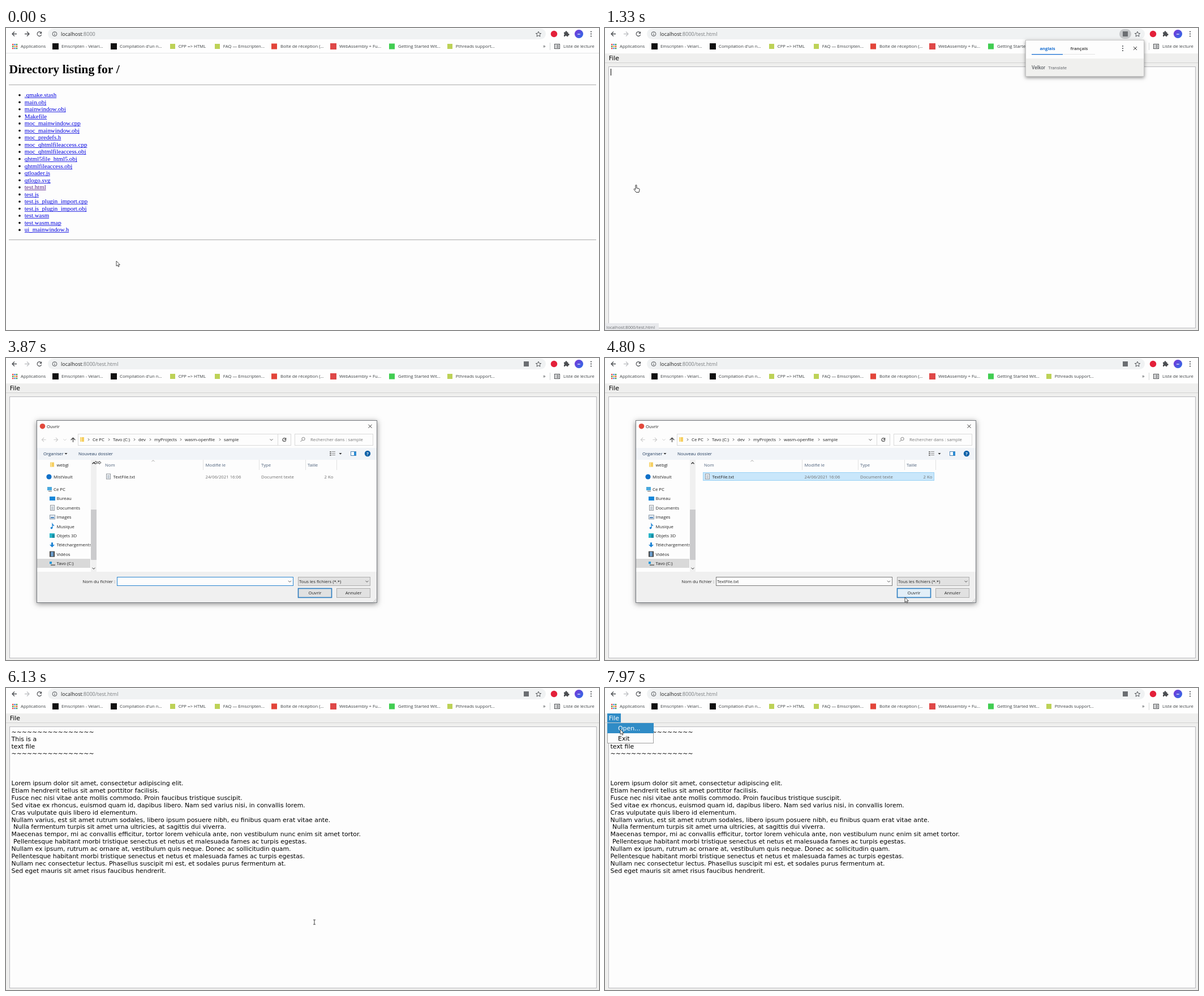
Write an HTML page with a canvas that moves like this. It is 1048 by 534 pixels and loops after 8000 ms.

```html
<!DOCTYPE html>
<html lang="fr">
<head>
<meta charset="utf-8">
<title>File access demo</title>
<style>
html, body { margin: 0; width: 100%; height: 100%; overflow: hidden; background: #fdfdfd }
canvas { display: block }
</style>
</head>
<body>
<canvas id="stage" width="1048" height="534"></canvas>
<script>
const ctx = document.getElementById('stage').getContext('2d');
const LOOP = 8000, PAPER = '#fdfdfd', INK = '#222', BLUE = '#308cc6';
const UI = '"Open Sans", sans-serif', QT = '"DejaVu Sans", sans-serif', SERIF = '"Liberation Serif", serif';

const between = (t, a, b) => t >= a && t < b;

function rect(x, y, w, h, fill, stroke, lineWidth = 1) {
  if (fill) { ctx.fillStyle = fill; ctx.fillRect(x, y, w, h); }
  if (stroke) { ctx.strokeStyle = stroke; ctx.lineWidth = lineWidth; ctx.strokeRect(x + .5, y + .5, w - 1, h - 1); }
}
function round(x, y, w, h, r, fill) {
  ctx.fillStyle = fill; ctx.beginPath(); ctx.roundRect(x, y, w, h, r); ctx.fill();
}
function disc(x, y, r, fill) {
  ctx.fillStyle = fill; ctx.beginPath(); ctx.arc(x, y, r, 0, 7); ctx.fill();
}
function ring(x, y, r, color, width = 1, from = 0, to = 2 * Math.PI) {
  ctx.strokeStyle = color; ctx.lineWidth = width;
  ctx.beginPath(); ctx.arc(x, y, r, from, to); ctx.stroke();
}
function path(d, x, y, stroke, width = 1, fill) {
  ctx.save(); ctx.translate(x, y);
  const p = new Path2D(d);
  if (fill) { ctx.fillStyle = fill; ctx.fill(p); }
  if (stroke) { ctx.strokeStyle = stroke; ctx.lineWidth = width; ctx.stroke(p); }
  ctx.restore();
}
// y is the baseline
function text(s, x, y, color = INK, size = 7.75, family = UI, weight = 400, align = 'left') {
  ctx.font = `${weight} ${size}px ${family}`;
  ctx.fillStyle = color; ctx.textAlign = align;
  ctx.fillText(s, x, y);
}
function shadowed(x, y, w, h, fill, blur) {
  ctx.save();
  ctx.shadowColor = 'rgba(0,0,0,.45)'; ctx.shadowBlur = blur; ctx.shadowOffsetY = 2;
  rect(x, y, w, h, fill);
  ctx.restore();
}

const ARROW = 'M-4 0H4M0-4L-4 0L0 4';
function arrow(x, y, angle, color, scale = 1) {
  ctx.save(); ctx.translate(x, y); ctx.rotate(angle); ctx.scale(scale, scale);
  path(ARROW, 0, 0, color, 1.3);
  ctx.restore();
}
const chevron = (x, y, color = '#555') => path('M-2.5-1.2L0 1.3L2.5-1.2', x, y, color);
const cross = (x, y, r = 3) => path(`M${-r} ${-r}L${r} ${r}M${r} ${-r}L${-r} ${r}`, x, y, '#333');
const dots = (x, y) => [-4, 0, 4].forEach(d => disc(x, y + d, 1.1, '#4a4d51'));
const folder = (x, y) => { rect(x, y - 4, 7, 8, '#f6cf60'); rect(x + 1, y - 4, 2, 8, '#fbe39a'); };
const reload = (x, y, r, color) => {
  ring(x, y, r, color, 1.2, .3, 5.4);
  path('M0-4V0H-4Z', x + r + .3, y - r + 3.2, null, 0, color);
};

const bookmarks = [
  [82, '#111', 11, 'Emscripten - Velari...'], [185, '#111', 11, "Compilation d'un n..."],
  [290, '#bdd257', 9, 'CPP => HTML'], [369, '#bdd257', 9, 'FAQ — Emscripten...'],
  [469, '#e2453a', 10, 'Boîte de réception (...'], [573, '#df4848', 11, 'WebAssembly + Fu...'],
  [677, '#41cd52', 10, 'Getting Started Wit...'], [780, '#bdd257', 9, 'Pthreads support...'],
];

function drawBrowser(onApp, popup) {
  rect(0, 0, 1048, 45, '#fefefe');
  arrow(15, 10.5, 0, '#4a4d51');
  arrow(37, 10.5, Math.PI, onApp ? '#bfc1c4' : '#4a4d51');
  reload(59, 10.5, 3.8, '#4a4d51');
  round(74, 1, 880, 19, 9.5, '#f0f2f3');
  ring(86, 10.5, 3.9, '#55585c');
  rect(85.5, 10, 1, 3, '#55585c'); rect(85.5, 8, 1, 1, '#55585c');
  text('localhost', 97, 13.8, INK, 9);
  const host = ctx.measureText('localhost').width;
  text(':8000' + (onApp ? '/test.html' : ''), 97 + host, 13.8, '#777a7d', 9);
  if (onApp) {
    if (popup) round(909, 2, 21, 17, 8.5, '#c6c8ca');
    rect(915, 6, 9, 9, '#6b6e72');
  }
  path('M0-4.6L1.4-1.5L4.7-1.2L2.2 1L3 4.3L0 2.5L-3 4.3L-2.2 1L-4.7-1.2L-1.4-1.5Z', 941, 10.8, '#55585c');
  disc(968.5, 10.5, 5.8, '#e3203a');
  path('M-4-2.5H-1.5A1.6 1.6 0 1 1 1.5-2.5H3.5V0A1.6 1.6 0 1 1 3.5 3V5H1A1.5 1.5 0 0 0-2 5H-4V2.5A1.5 1.5 0 0 0-4-.2Z', 990, 10, null, 0, '#4a4d51');
  const glow = ctx.createLinearGradient(1005, 4, 1020, 17);
  glow.addColorStop(0, '#7a35d8'); glow.addColorStop(1, '#2b6ee6');
  disc(1012.5, 10.5, 7.6, glow);
  text('we', 1012.5, 11.5, '#fff', 3.5, UI, 700, 'center');
  dots(1034, 10.5);

  const palette = ['#e5453a', '#f0b429', '#3d9a50', '#4285e8'];
  for (let i = 0; i < 9; i++) rect(11 + i % 3 * 3.4, 28 + (i / 3 | 0) * 3.4, 2.4, 2.4, palette[(i * 3 + (i / 3 | 0)) % 4]);
  text('Applications', 26, 35.3, '#3c4043');
  for (const [x, color, size, label] of bookmarks) {
    rect(x, 32.5 - size / 2, size, size, color);
    text(label, x + (size === 9 ? 14.8 : 16), 35.3, '#3c4043');
  }
  text('»', 949, 35, '#3c4043', 9);
  rect(961, 26, 1, 13, '#d4d6d8');
  rect(969, 28, 10, 9, null, '#4a4d51');
  for (let y = 30; y < 36; y += 2) { rect(971, y, 1, 1, '#4a4d51'); rect(973, y, 4, 1, '#4a4d51'); }
  text('Liste de lecture', 985, 35.3, '#3c4043');
}

const files = `.qmake.stash main.obj mainwindow.obj Makefile moc_mainwindow.cpp moc_mainwindow.obj
moc_predefs.h moc_qhtmlfileaccess.cpp moc_qhtmlfileaccess.obj qhtml5file_html5.obj qhtmlfileaccess.obj
qtloader.js qtlogo.svg test.html test.js test.js_plugin_import.cpp test.js_plugin_import.obj test.wasm
test.wasm.map ui_mainwindow.h`.split(/\s+/);

function drawListing() {
  text('Directory listing for /', 5.5, 80.3, '#000', 21.7, SERIF, 700);
  rect(5, 100, 1038, 1, '#aaa'); rect(5, 374, 1038, 1, '#aaa');
  files.forEach((name, i) => {
    const y = 122 + i * 12.55, color = name === 'test.html' ? '#551a8b' : '#0000e0';
    disc(24, y - 3.3, 1.8, '#000');
    text(name, 32.8, y, color, 10.92, SERIF);
    rect(32.8, Math.round(y + 1), ctx.measureText(name).width, .8, color);
  });
}

const TILDES = '~'.repeat(16);
const loaded = [TILDES, 'This is a', 'text file', TILDES, '', '', '',
  'Lorem ipsum dolor sit amet, consectetur adipiscing elit.',
  'Etiam hendrerit tellus sit amet porttitor facilisis.',
  'Fusce nec nisi vitae ante mollis commodo. Proin faucibus tristique suscipit.',
  'Sed vitae ex rhoncus, euismod quam id, dapibus libero. Nam sed varius nisi, in convallis lorem.',
  'Cras vulputate quis libero id elementum.',
  'Nullam varius, est sit amet rutrum sodales, libero ipsum posuere nibh, eu finibus quam erat vitae ante.',
  ' Nulla fermentum turpis sit amet urna ultricies, at sagittis dui viverra.',
  'Maecenas tempor, mi ac convallis efficitur, tortor lorem vehicula ante, non vestibulum nunc enim sit amet tortor.',
  ' Pellentesque habitant morbi tristique senectus et netus et malesuada fames ac turpis egestas.',
  'Nullam ex ipsum, rutrum ac ornare at, vestibulum quis neque. Donec ac sollicitudin quam.',
  'Pellentesque habitant morbi tristique senectus et netus et malesuada fames ac turpis egestas.',
  'Nullam nec consectetur lectus. Phasellus suscipit mi est, et sodales purus fermentum at.',
  'Sed eget mauris sit amet risus faucibus hendrerit.'];

function drawApp(t, menu, mouseY) {
  rect(0, 45, 1048, 489, '#efefee');
  rect(0, 61, 1048, 1, '#d2d2d2');
  rect(6, 68, 1038, 463, PAPER, '#b9b9bd');
  if (t >= 5450) loaded.forEach((line, i) => text(line, 9.6, 81.5 + i * 12.92, '#000', 10.9, QT));
  if (between(t, 1150, 2400) && (t - 1150) % 1060 < 530) rect(10, 72, 1, 12, '#000');
  if (menu) rect(4, 45, 24, 16, BLUE);
  text('File', 6.8, 56.8, menu ? '#fff' : '#000', 10.9, QT);
  if (menu) {
    const hover = mouseY > 62;
    rect(4, 62, 82, 36, PAPER, '#a0a0a0');
    if (hover) rect(4, 62, 82, 18, BLUE);
    text('Open...', 23, 75, hover ? '#fff' : '#000', 10.9, QT);
    text('Exit', 23, 93.3, '#000', 10.9, QT);
  }
}

function drawTranslatePopup() {
  shadowed(743, 21, 210, 65, PAPER, 6);
  rect(743, 54, 210, 32, '#f0f0ee');
  rect(743, 21, 210, 65, null, '#c4c4c4');
  text('anglais', 782, 39, '#1a70d2', 7.7, UI, 700, 'center');
  text('français', 838, 39, '#555', 7.7, UI, 700, 'center');
  rect(754, 46, 55, 1.3, '#1a70d2'); rect(809, 46, 57, 1, '#e4e4e4');
  dots(915, 36); cross(937, 36);
  text('Velkor', 754, 72.7, '#5f6368', 8.4, 'Roboto, sans-serif', 500);
  text('Translate', 816, 72.7, '#6b6e72', 8, 'Roboto, sans-serif', 400, 'right');
}

const crumbs = [[153, 'Ce PC'], [189, 'Tavo (C:)'], [234, 'dev'], [262, 'myProjects'], [316, 'wasm-openfile'], [385, 'sample']];
const columns = [[175, 'Nom', 348], [352.5, 'Modifié le', 447], [451, 'Type', 529], [533, 'Taille', 584]];
const places = ['Bureau', 'Documents', 'Images', 'Musique', 'Objets 3D', 'Téléchargements', 'Vidéos', 'Tavo (C:)'];

function page(x, y) {
  rect(x, y - 5, 8, 10, '#fafafa', '#8d949b');
  for (let d = -2; d < 4; d += 2) rect(x + 2, y + d, 4, .8, '#7a8fa5');
}
function placeIcon(i, y) {
  const x = 77;
  if (i === 0) rect(x, y - 3.5, 10, 7, '#1687d9');
  if (i === 1) page(x + 1, y);
  if (i === 2) { rect(x, y - 4, 10, 8, '#e8eef4', '#8a99a8'); rect(x + 2, y, 6, 2, '#3c77b5'); }
  if (i === 3) { disc(x + 3.5, y + 3, 1.8, '#1d83d4'); path('M0 7V0Q1 2 3 3', x + 5, y - 4, '#1d83d4', 1.3); }
  if (i === 4) { rect(x, y - 4, 9, 8, '#28b4c8'); rect(x + 4.5, y - 2, 4.5, 6, '#168ba2'); }
  if (i === 5) path('M3-4H6V0H9L4.5 4.5L0 0H3Z', x, y, null, 0, '#1d83d4');
  if (i === 6) { rect(x, y - 5, 9, 10, '#444'); rect(x + 2, y - 4, 5, 8, '#6a9bc9'); }
  if (i === 7) { rect(x, y - 3, 4, 4, '#2196d8'); rect(x + 2, y + 2, 8, 2, '#777'); }
}

function drawDialog(selected, rowHover, openHover) {
  shadowed(54, 110, 602, 323, PAPER, 9);
  disc(64.5, 120.7, 4.8, '#e2493c');
  text('Ouvrir', 72, 123.7); cross(643.5, 120.7);
  arrow(67, 144.5, 0, '#ccc', .9); arrow(88, 144.5, Math.PI, '#ccc', .9);
  chevron(104, 144.5, '#ccc'); arrow(118.5, 145, Math.PI / 2, '#444', .95);

  rect(127, 134, 377, 21, null, '#dadada'); rect(480, 134, 1, 21, '#dadada');
  folder(131, 144);
  for (const [x, label] of crumbs) {
    path('M-1-2L1 0L-1 2', x - 7, 144.3, '#555');
    text(label, x, 147.3);
  }
  chevron(469, 144.5); reload(492, 144.5, 3, '#555');
  rect(510, 134, 139, 21, null, '#dadada');
  ring(525.5, 143, 2.7, '#777', .9); path('M0 0L-3 3', 523.5, 145, '#777');
  text('Rechercher dans : sample', 538, 147.3, '#777');

  rect(54, 159, 602, 21, '#f1f4f8');
  text('Organiser', 66, 172.3, '#1e395b'); text('Nouveau dossier', 128, 172.3, '#1e395b');
  for (const x of [106, 591]) path('M-2.5-1H2.5L0 1.8Z', x, 169, null, 0, '#333');
  for (let y = 165; y < 173; y += 3) { rect(572, y, 3, 2, '#888'); rect(576, y, 6, 1, '#888'); }
  rect(609, 165, 10, 8, '#fff', '#4c84b5'); rect(615, 166, 4, 6, '#2b8cd6');
  disc(639, 169, 5.2, '#1062a8'); text('?', 639, 171.8, '#fff', 7.5, UI, 700, 'center');

  ctx.save();
  ctx.beginPath(); ctx.rect(54, 180, 95.5, 198); ctx.clip();
  rect(54, 355, 95, 16, '#d9d9d9');
  folder(78, 188.5); text('webgl', 89.5, 191.5);
  disc(76, 210, 4.6, '#1070c8'); text('MistVault', 84, 213);
  rect(73, 228, 8, 6, '#4aa8dc'); rect(75, 235, 6, 1, '#666'); text('Ce PC', 84, 235);
  places.forEach((name, i) => {
    const y = 248.5 + i * 16.37;
    placeIcon(i, y);
    text(name, 89.5, y + 2.9);
  });
  ctx.restore();
  rect(150, 180, 10, 198, '#f0f0f0'); rect(150, 268, 10, 89, '#cbcbcd');
  path('M-2.5 1.2L0-1.3L2.5 1.2', 155, 186, '#333', 1.3); chevron(155, 372, '#333');

  for (const [x, label, edge] of columns) {
    text(label, x, 191.8, '#4c607a');
    rect(edge, 180, 1, 18, '#e2e2e2');
  }
  path('M-2.5 1.2L0-1.3L2.5 1.2', 260, 182, '#888', .8);
  if (selected) rect(173, 202, 409, 15, '#c9e7fb', '#99d1f5');
  else if (rowHover) rect(173, 202, 409, 15, '#e5f3fb');
  page(177, 209.5);
  text('TextFile.txt', 189.5, 212.8);
  text('24/06/2021 16:06', 352.5, 212.8, '#6d6d6d');
  text('Document texte', 451, 212.8, '#6d6d6d');
  text('2 Ko', 578.5, 212.8, '#6d6d6d', 7.75, UI, 400, 'right');

  rect(54, 378, 602, 55, '#f0f0f0');
  text('Nom du fichier :', 193, 397.6, INK, 7.75, UI, 400, 'right');
  rect(196, 387, 312, 16, PAPER, selected ? '#7a7a7a' : '#2b86d0');
  if (selected) text('TextFile.txt', 198, 397.6);
  rect(516, 387, 128, 16, '#e2e2e2', '#adadad');
  text('Tous les fichiers (*.*)', 518, 397.6);
  chevron(501.5, 395); chevron(638, 395);
  rect(516, 407, 60, 17, openHover ? '#e3eff8' : '#e1e1e1', '#2b7cc0', 1.6);
  rect(584, 407, 60, 17, '#e1e1e1', '#adadad');
  text('Ouvrir', 546, 418.2, INK, 7.75, UI, 400, 'center');
  text('Annuler', 614, 418.2, INK, 7.75, UI, 400, 'center');
  for (let i = 0; i < 3; i++) for (let j = 0; j <= i; j++) rect(653 - j * 2, 426 + i * 2, 1, 1, '#aaa');
  rect(54, 110, 602, 323, null, '#777b80');
}

// time, x, y of the pointer's hot spot
const route = [[0, 195, 412], [30, 195, 412], [620, 54, 278], [1500, 54, 278], [2200, 18, 52], [2400, 18, 52],
  [2950, 28, 68], [3300, 28, 68], [3870, 162, 185], [4200, 214, 209], [4400, 214, 209], [4800, 530, 423],
  [5000, 545, 414], [6270, 545, 414], [7250, 20, 52], [7550, 20, 52], [7900, 27, 73], [LOOP, 27, 73]];
const clicks = [720, 2480, 3100, 4290, 5060, 7420];

function pointer(t) {
  const i = route.findIndex(stop => stop[0] > t);
  const [t0, x0, y0] = route[i - 1], [t1, x1, y1] = route[i];
  const u = (t - t0) / (t1 - t0), e = u * u * (3 - 2 * u);
  return [x0 + (x1 - x0) * e, y0 + (y1 - y0) * e];
}

const cursors = {
  arrow: (x, y) => path('M0 0V9L2.1 7.2L3.5 10.2L5 9.5L3.6 6.6H6.3Z', x, y, '#222', .8, '#fff'),
  hand: (x, y) => path('M0 0Q1.2-1.2 2 .2V5L6.2 6Q7.2 6.4 7 8L6 12.5H1L-2.8 7.5Q-3.2 6-1.6 6.4L0 7.6Z', x, y, '#222', .9, '#fff'),
  beam: (x, y) => path('M-2-4H2M0-4V4M-2 4H2', x, y, '#333', .9),
  resize: (x, y) => path('M-6 0L-3-2.5V-1H3V-2.5L6 0L3 2.5V1H-3V2.5Z', x, y, '#222', .8, '#fff'),
};

function draw(t) {
  const [x, y] = pointer(t);
  const onApp = t >= 800, popup = between(t, 1200, 2480);
  const menu = between(t, 2480, 3110) || t >= 7420, dialog = between(t, 3330, 5170);
  rect(0, 0, 1048, 534, PAPER);
  if (t >= 1050) drawApp(t, menu, y);
  else if (!onApp) drawListing();
  drawBrowser(onApp, popup);
  if (t < 1050) rect(0, 44, 1048, 1, '#e3e4e6');
  if (between(t, 580, 1800)) {
    rect(0, 522, 95, 12, '#e8e9ec');
    text('localhost:8000/test.html', 2.5, 532, '#6b6e72', 7.6);
  }
  if (popup) drawTranslatePopup();
  if (dialog) drawDialog(t >= 4290, y > 202 && y < 217, x > 516 && y > 407 && y < 424);

  for (const c of clicks) {
    const age = t - c;
    if (between(age, 0, 180)) ring(x, y, 2 + age * .05, `rgba(148,188,62,${1 - age / 280})`, 1.3);
  }
  let kind = 'arrow';
  if (between(t, 580, 1500)) kind = 'hand';
  else if (dialog && x > 157 && x < 168) kind = 'resize';
  else if (onApp && !dialog && !menu && y > 70) kind = 'beam';
  cursors[kind](x, y);
}

function tick(now) {
  draw(now % LOOP);
  requestAnimationFrame(tick);
}
requestAnimationFrame(tick);
</script>
</body>
</html>
```
